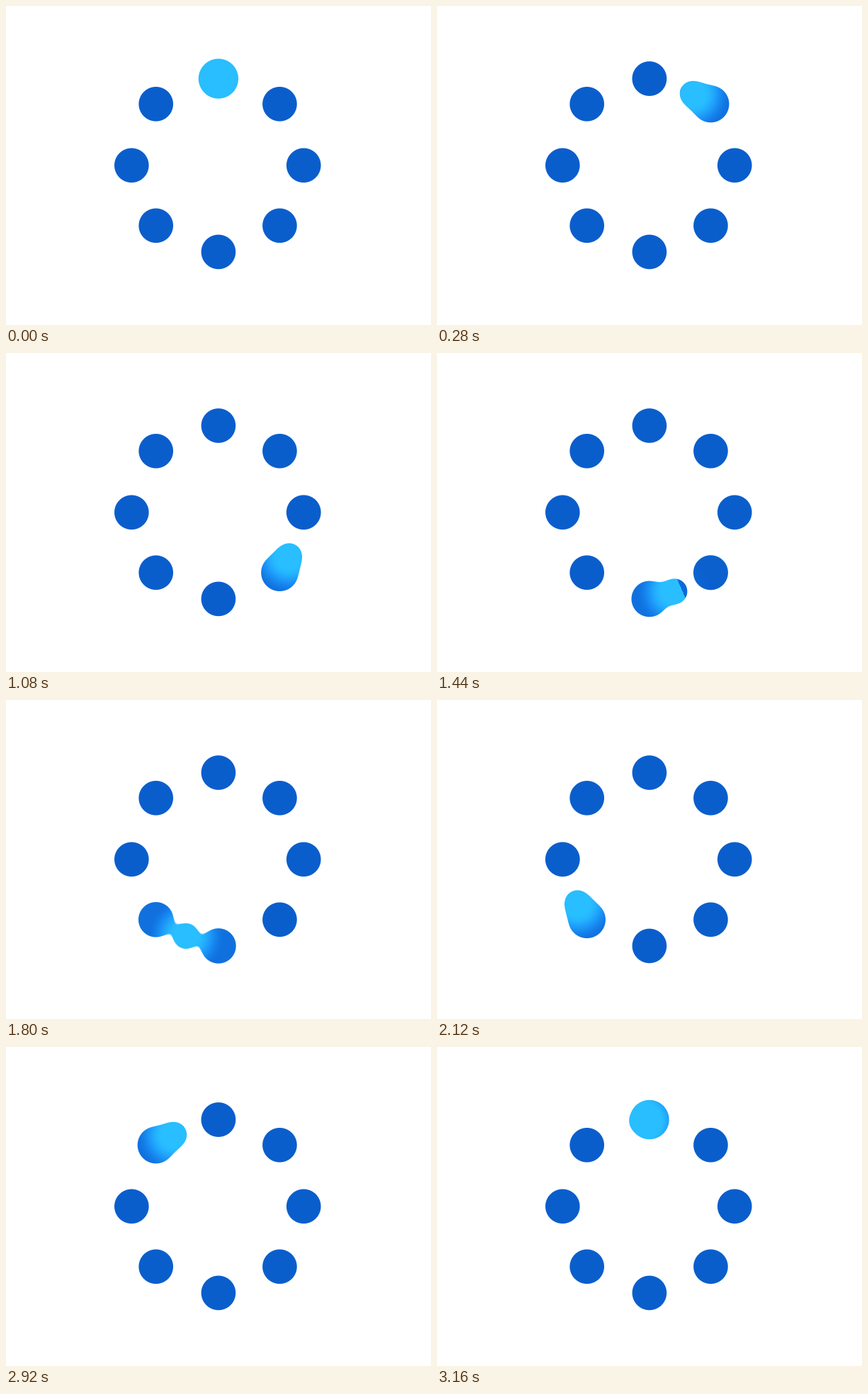
An HTML page with a canvas that plays this animation: 600 by 450 pixels, repeating every 3200 ms.

```html
<!DOCTYPE html>
<html lang="en">
<head>
<meta charset="utf-8">
<title>Loader</title>
<style>
  html, body { margin: 0; width: 100%; height: 100%; overflow: hidden; background: #fff; }
  canvas { display: block; }
</style>
</head>
<body>
<canvas id="stage" width="600" height="450"></canvas>
<script>
const LOOP = 3200, STEP = 40;
const CX = 299, CY = 224.6, ORBIT = 122, DIP = 4.7;
const DOT_R = 24.3, BALL_R = 18, GOO = 17.5;
const DARK = [10, 94, 204], LIGHT = [40, 190, 255];
const LEFT = 142, TOP = 66, SIZE = 314;

const ctx = document.getElementById('stage').getContext('2d');
const image = ctx.createImageData(SIZE, SIZE);

const clamp = v => Math.min(1, Math.max(0, v));
const smooth = (a, b, v) => { const t = clamp((v - a) / (b - a)); return t * t * (3 - 2 * t); };
const bell = (d, width) => Math.exp(-((d / width) ** 2));

const dots = [
  [299.9, 102.5], [386.4, 138.3], [420.2, 224.8], [386.4, 309.8],
  [299.9, 346.9], [211.7, 309.8], [177.3, 224.8], [211.7, 138.3]
].map(([x, y]) => ({ x, y }));

// The ball's orbit dips inwards between the dots
function ballAt(time) {
  const angle = time / LOOP * 2 * Math.PI;
  const r = ORBIT - DIP * Math.abs(Math.sin(4 * angle));
  return { x: CX + r * Math.sin(angle), y: CY - r * Math.cos(angle) };
}

// Smooth union of two signed distances
function melt(a, b, k) {
  const h = Math.max(k - Math.abs(a - b), 0) / k;
  return Math.min(a, b) - h * h * k / 4;
}

function draw(time) {
  const ball = ballAt(time);
  let nearest = Infinity;
  for (const dot of dots) {
    const d = Math.hypot(dot.x - ball.x, dot.y - ball.y);
    nearest = Math.min(nearest, d);
    dot.r = DOT_R + 3.8 * bell(d, 33);
    dot.k = Math.max(0.1, GOO * Math.min(1, d / 28) ** 2);
    dot.warm = 1 - smooth(48, 60, d);
  }
  const core = 16 + 16 * bell(nearest, 14);
  const data = image.data;

  for (let row = 0, n = 0; row < SIZE; row++) {
    for (let col = 0; col < SIZE; col++, n += 4) {
      const x = LEFT + col + 0.5, y = TOP + row + 0.5;
      const bx = x - ball.x, by = y - ball.y;
      const away = Math.sqrt(bx * bx + by * by);
      let edge = away - BALL_R, closest = 50, warm = 1;
      for (const dot of dots) {
        const dx = x - dot.x, dy = y - dot.y;
        if (Math.abs(dx) > 50 || Math.abs(dy) > 50) continue;
        const d = Math.sqrt(dx * dx + dy * dy);
        edge = melt(edge, d - dot.r, dot.k);
        if (d < closest) { closest = d; warm = dot.warm; }
      }
      // Only dots touched by the ball take on its colour
      const glow = warm * (1 - 0.8 * smooth(core, 54, away));
      const blueGlow = 1 - (1 - glow) ** 2;
      for (let c = 0; c < 3; c++) {
        data[n + c] = DARK[c] + (LIGHT[c] - DARK[c]) * (c === 2 ? blueGlow : glow);
      }
      data[n + 3] = 255 * clamp(0.5 - edge);
    }
  }
  ctx.putImageData(image, LEFT, TOP);
}

let shown = -1;
function tick() {
  const step = Math.floor(performance.now() % LOOP / STEP);
  if (step !== shown) draw((shown = step) * STEP);
  requestAnimationFrame(tick);
}
tick();
</script>
</body>
</html>
```
